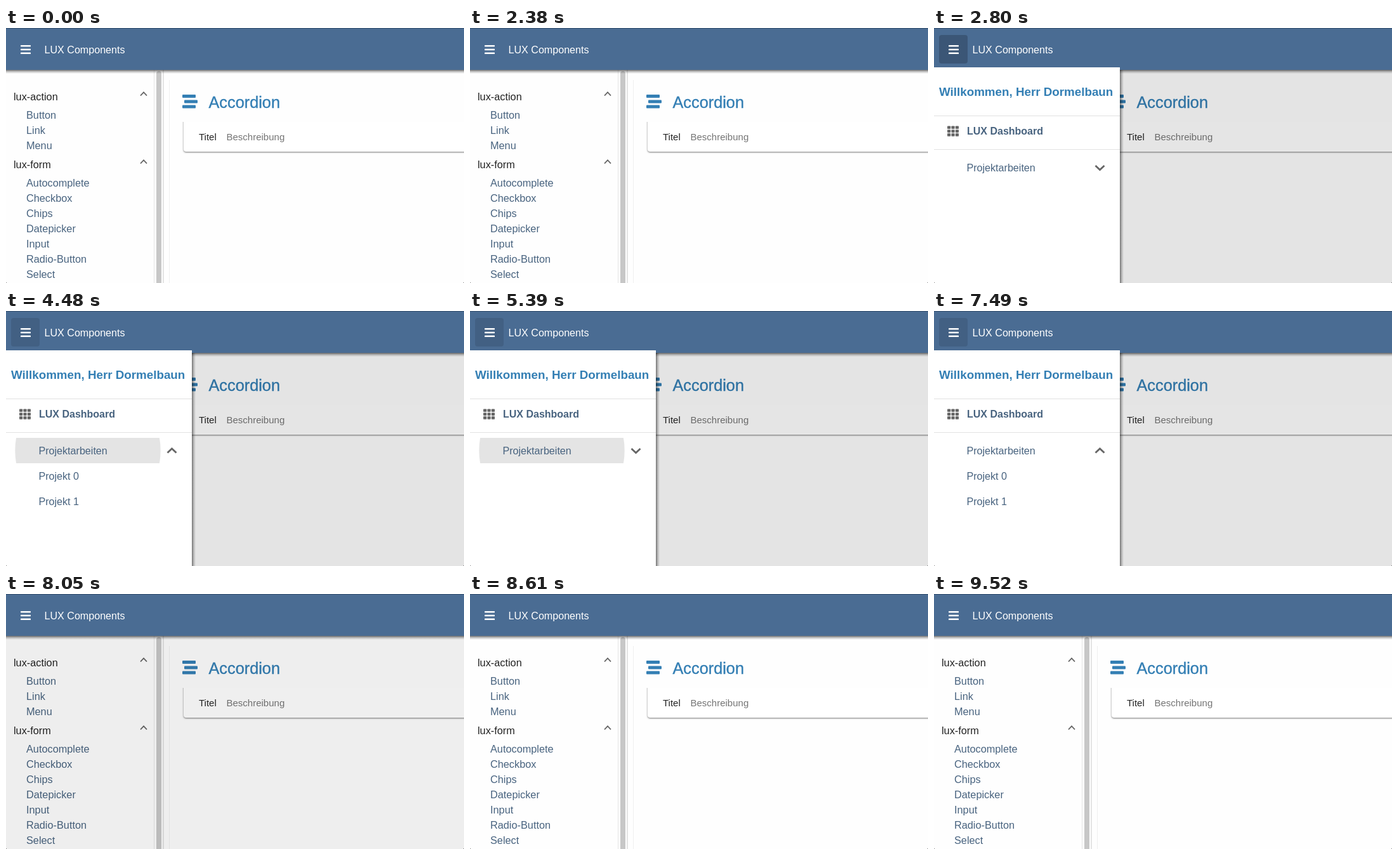
An HTML page with a canvas that plays this animation: 722x402 px, repeating every 9800 ms.

```html
<!DOCTYPE html>
<html lang="de">
<head>
<meta charset="utf-8">
<title>LUX Components</title>
<style>
  html, body { margin: 0; width: 100%; height: 100%; overflow: hidden; background: #fff; }
  canvas { display: block; }
</style>
</head>
<body>
<canvas id="stage" width="722" height="402"></canvas>
<script>
const W = 722, H = 402, LOOP = 9800;
const ctx = document.getElementById('stage').getContext('2d');
const FONT = '"Liberation Sans", Arial, sans-serif';
const LINK = '#48637f', BLUE = '#347fb4', GRAY = '#666';
const DRAWER = 293;
const OPEN_AT = 2430, CLOSE_AT = 7860;
// Start of each press on the expandable row; it toggles 140 ms later.
const PRESSES = [4340, 5250, 6850];

const progress = (t, start, length) => Math.min(1, Math.max(0, (t - start) / length));
const easeOut = p => 1 - (1 - p) ** 3;

function rect(x, y, w, h, color) {
  ctx.fillStyle = color;
  ctx.fillRect(x, y, w, h);
}

function round(x, y, w, h, r, color) {
  ctx.fillStyle = color;
  ctx.beginPath();
  ctx.roundRect(x, y, w, h, r);
  ctx.fill();
}

function text(str, x, y, size, color, weight = 400) {
  ctx.font = `${weight} ${size}px ${FONT}`;
  ctx.fillStyle = color;
  ctx.fillText(str, x, y);
}

function chevron(x, y, w, h, line) {
  ctx.strokeStyle = GRAY;
  ctx.lineWidth = line;
  ctx.beginPath();
  ctx.moveTo(x - w, y + h);
  ctx.lineTo(x, y - h);
  ctx.lineTo(x + w, y + h);
  ctx.stroke();
}

function fade(x0, y0, x1, y1, alpha) {
  const g = ctx.createLinearGradient(x0, y0, x1, y1);
  g.addColorStop(0, `rgba(0,0,0,${alpha})`);
  g.addColorStop(0.5, `rgba(0,0,0,${alpha * 0.38})`);
  g.addColorStop(1, 'rgba(0,0,0,0)');
  return g;
}

function drawMenu() {
  const group = (name, y, items) => {
    text(name, 12, y, 16.3, '#222');
    chevron(217, y - 10, 5, 2.7, 1.7);
    items.forEach((item, i) => text(item, 32, y + 29 + i * 24, 16.3, LINK));
  };
  group('lux-action', 114, ['Button', 'Link', 'Menu']);
  group('lux-form', 221, ['Autocomplete', 'Checkbox', 'Chips', 'Datepicker',
    'Input', 'Radio-Button', 'Select']);
  rect(233, 66, 1, H, '#e6e6e6');
  round(237, 68, 8, H, 4, '#c7c7c7');
  rect(247, 66, 2, H, '#e4e4e4');
}

function drawContent() {
  rect(257, 82, 1, H, '#f0f0f0');
  round(278, 105, 21, 5, 1, BLUE);
  round(281, 113.5, 21, 5, 1, BLUE);
  round(278, 121.5, 21, 5, 1, BLUE);

  text('Accordion', 319.5, 125.5, 25.3, BLUE);
  ctx.strokeStyle = BLUE;
  ctx.lineWidth = 0.4;
  ctx.strokeText('Accordion', 319.5, 125.5);

  ctx.save();
  ctx.beginPath();
  ctx.rect(270, 148, W, 60);
  ctx.clip();
  ctx.shadowColor = 'rgba(0,0,0,.55)';
  ctx.shadowBlur = 2.5;
  ctx.shadowOffsetY = 1;
  round(280, 140, W, 55, 4, '#fff');
  ctx.restore();
  text('Titel', 304, 177, 15, '#222');
  text('Beschreibung', 347.5, 177, 15, '#757575');
}

function drawHeader(t) {
  rect(0, 66, W, 6, fade(0, 66, 0, 72, 0.55));
  rect(0, 0, W, 66, '#4a6c93');
  rect(0, 0, W, 1, '#344f6f');
  const shown = progress(t, 2400, 150) * (1 - progress(t, CLOSE_AT, 150));
  const alpha = 0.2 - 0.09 * progress(t, 2850, 300);
  round(8, 11, 45, 45, 4, `rgba(0,0,0,${alpha * shown})`);
  for (let i = 0; i < 3; i++) round(23, 27 + i * 5.8, 16, 2.4, 0.6, '#fff');
  text('LUX Components', 60.5, 40, 16.1, '#fff');
}

function drawRipple(t) {
  ctx.save();
  ctx.beginPath();
  ctx.rect(8, 200, 241, 40);
  ctx.clip();
  for (const start of PRESSES) {
    const alpha = 0.105 * (1 - progress(t, start + 280, 350));
    if (t <= start || alpha <= 0) continue;
    ctx.fillStyle = `rgba(0,0,0,${alpha})`;
    ctx.beginPath();
    ctx.arc(129, 220, 121 * easeOut(progress(t, start, 225)), 0, 7);
    ctx.fill();
  }
  ctx.restore();
}

function drawDrawer(t) {
  const p = easeOut(progress(t, OPEN_AT, 250)) * (1 - easeOut(progress(t, CLOSE_AT, 170)));
  if (p <= 0) return;
  const expanded = PRESSES.filter(start => t >= start + 140).length % 2 === 1;
  ctx.save();
  ctx.translate(DRAWER * (p - 1), 0);
  rect(DRAWER, 66, 6, H, fade(DRAWER, 0, DRAWER + 6, 0, 0.5));
  rect(0, 62, DRAWER, H, '#fff');
  text('Willkommen, Herr Dormelbaun', 8, 107, 18.8, BLUE, 700);
  rect(0, 138, DRAWER, 1, '#e2e2e2');
  for (let i = 0; i < 9; i++) {
    round(21 + i % 3 * 6.4, 154.5 + Math.floor(i / 3) * 5.8, 5.2, 4.6, 0.8, GRAY);
  }
  text('LUX Dashboard', 52, 168, 16, LINK, 700);
  rect(0, 191, DRAWER, 1, '#e2e2e2');

  drawRipple(t);
  text('Projektarbeiten', 51.5, 226, 16.1, LINK);
  chevron(261.5, 220.3, 7, expanded ? 3.3 : -3.3, 2.8);
  if (expanded) {
    text('Projekt 0', 51.5, 266, 16.1, LINK);
    text('Projekt 1', 51.5, 306, 16.1, LINK);
  }
  ctx.restore();
}

function draw(t) {
  rect(0, 0, W, H, '#fefefe');
  drawMenu();
  drawContent();
  const shade = easeOut(progress(t, OPEN_AT, 330)) * (1 - progress(t, CLOSE_AT, 520));
  rect(0, 66, W, H, `rgba(0,0,0,${0.1 * shade})`);
  drawHeader(t);
  drawDrawer(t);
  rect(0, H - 1, 1, 1, '#777');
  rect(W - 1, H - 1, 1, 1, '#777');
}

function tick(now) {
  draw(now % LOOP);
  requestAnimationFrame(tick);
}
draw(0);
requestAnimationFrame(tick);
</script>
</body>
</html>
```
